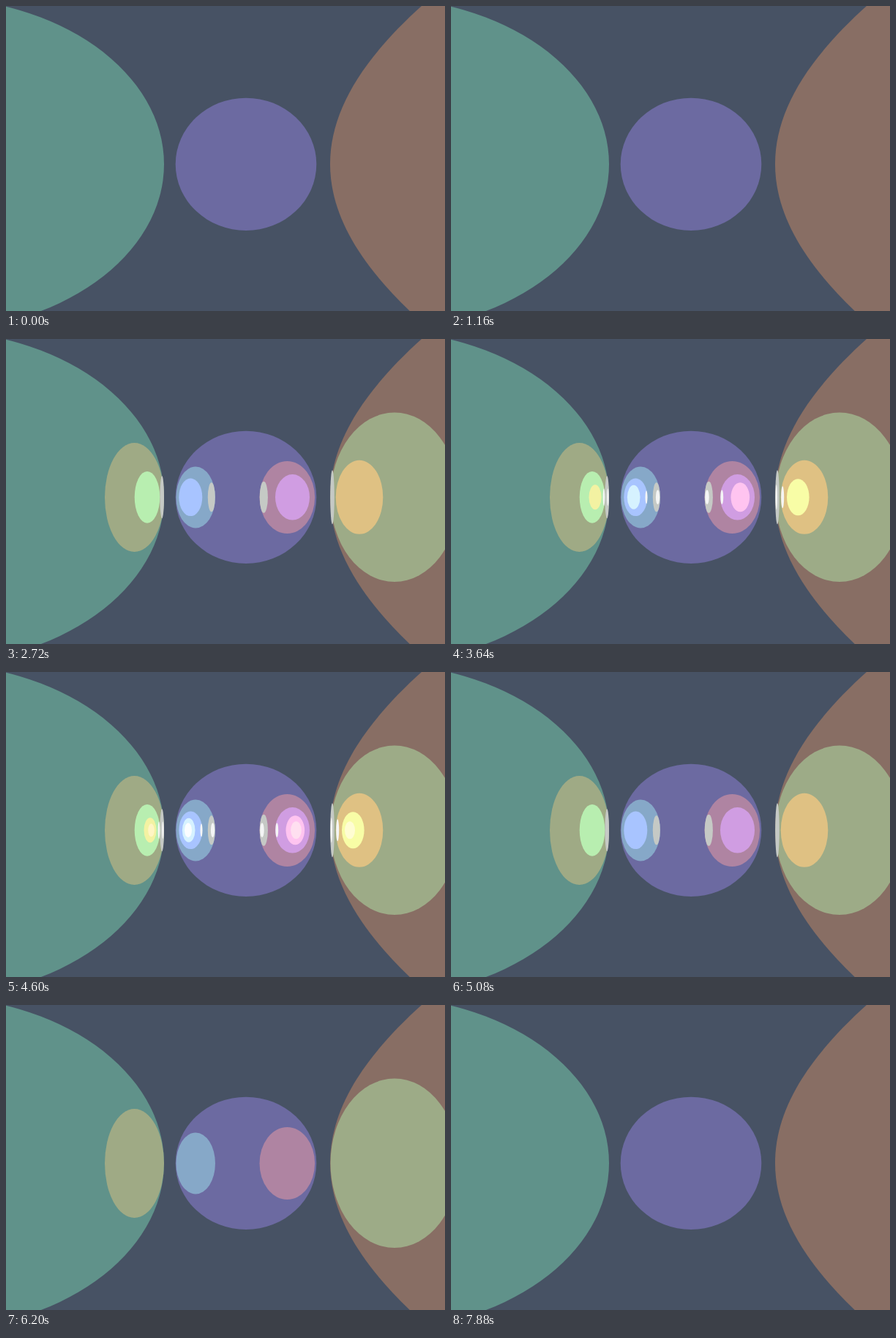
An HTML page for the animation above (7920 ms loop, 600x417 px).

```html
<!DOCTYPE html>
<html lang="en">
<head>
<meta charset="utf-8">
<title>Nested ellipses</title>
<style>
  html, body { margin: 0; width: 100%; height: 100%; overflow: hidden; background: #475264; }
  svg { display: block; width: 600px; height: 417px; }
  .level { visibility: hidden; animation: 7.92s step-end infinite; }
  #level2 { animation-name: second; }
  #level3 { animation-name: third; }
  #level4 { animation-name: fourth; }
  #level5 { animation-name: fifth; }
  /* One step is a ninth of the loop. */
  @keyframes second { 0%, 81.8182% { visibility: hidden; } 15.1515% { visibility: visible; } }
  @keyframes third  { 0%, 70.7071% { visibility: hidden; } 26.2626% { visibility: visible; } }
  @keyframes fourth { 0%, 59.596%  { visibility: hidden; } 37.3737% { visibility: visible; } }
  @keyframes fifth  { 0%, 59.596%  { visibility: hidden; } 48.4848% { visibility: visible; } }
</style>
</head>
<body>
<svg viewBox="0 0 600 417">
  <ellipse cx="-104" cy="216.3" rx="320" ry="228" fill="#60928a"/>
  <ellipse cx="328" cy="216.3" rx="96.3" ry="90.6" fill="#6c6aa1"/>
  <path d="M568 0C401.3 150 401.3 282 568 432H640V0Z" fill="#886e64"/>

  <g id="level2" class="level">
    <ellipse cx="175.5" cy="216.5" rx="40.5" ry="74.5" fill="#9faa85"/>
    <ellipse cx="259.2" cy="216.5" rx="26.8" ry="42" fill="#86a8c8"/>
    <ellipse cx="384.3" cy="216.5" rx="37.8" ry="49.5" fill="#af84a2"/>
    <ellipse cx="531" cy="216.3" rx="87.5" ry="115.8" fill="#9dab87"/>
  </g>

  <g id="level3" class="level">
    <g fill="#c5c9c5">
      <ellipse cx="213.2" cy="216.3" rx="2.8" ry="29"/>
      <ellipse cx="280.8" cy="216.3" rx="5" ry="20"/>
      <ellipse cx="352.3" cy="216.3" rx="5.6" ry="21.5"/>
      <ellipse cx="446" cy="216.3" rx="2.8" ry="37"/>
    </g>
    <ellipse cx="193" cy="216.3" rx="17.3" ry="35.4" fill="#b8eeb0"/>
    <ellipse cx="252.3" cy="216.3" rx="16" ry="25.8" fill="#a8c4ff"/>
    <ellipse cx="391.5" cy="216.3" rx="23.5" ry="31.3" fill="#d09de2"/>
    <ellipse cx="483" cy="216.3" rx="32.3" ry="50.5" fill="#dfc183"/>
  </g>

  <g id="level4" class="level">
    <g fill="#f4f5f5">
      <ellipse cx="209" cy="216.3" rx="1.3" ry="12"/>
      <ellipse cx="214.4" cy="216.3" rx="1.2" ry="12"/>
      <ellipse cx="267" cy="216.3" rx="1.5" ry="9"/>
      <ellipse cx="282.5" cy="216.3" rx="2.6" ry="10"/>
      <ellipse cx="350" cy="216.3" rx="2.7" ry="10"/>
      <ellipse cx="370.3" cy="216.3" rx="1.9" ry="10"/>
      <ellipse cx="444.8" cy="216.3" rx="1.2" ry="17"/>
      <ellipse cx="453.2" cy="216.3" rx="2" ry="15"/>
    </g>
    <ellipse cx="197" cy="216.3" rx="8.5" ry="17" fill="#f3f2a2"/>
    <ellipse cx="249.7" cy="216.3" rx="8.8" ry="16.5" fill="#d6f2ff"/>
    <ellipse cx="395.3" cy="216.3" rx="12.8" ry="20" fill="#ffc4f0"/>
    <ellipse cx="474.3" cy="216.3" rx="15.3" ry="25" fill="#f8fda6"/>
  </g>

  <g id="level5" class="level">
    <ellipse cx="198.5" cy="216.3" rx="4.3" ry="9" fill="#fff5c4"/>
    <ellipse cx="249" cy="216.3" rx="5" ry="10" fill="#fafdff"/>
    <ellipse cx="396.5" cy="216.3" rx="7.3" ry="12" fill="#ffdff0"/>
    <ellipse cx="470" cy="216.3" rx="7" ry="12" fill="#fffdd2"/>
  </g>
</svg>
</body>
</html>
```
